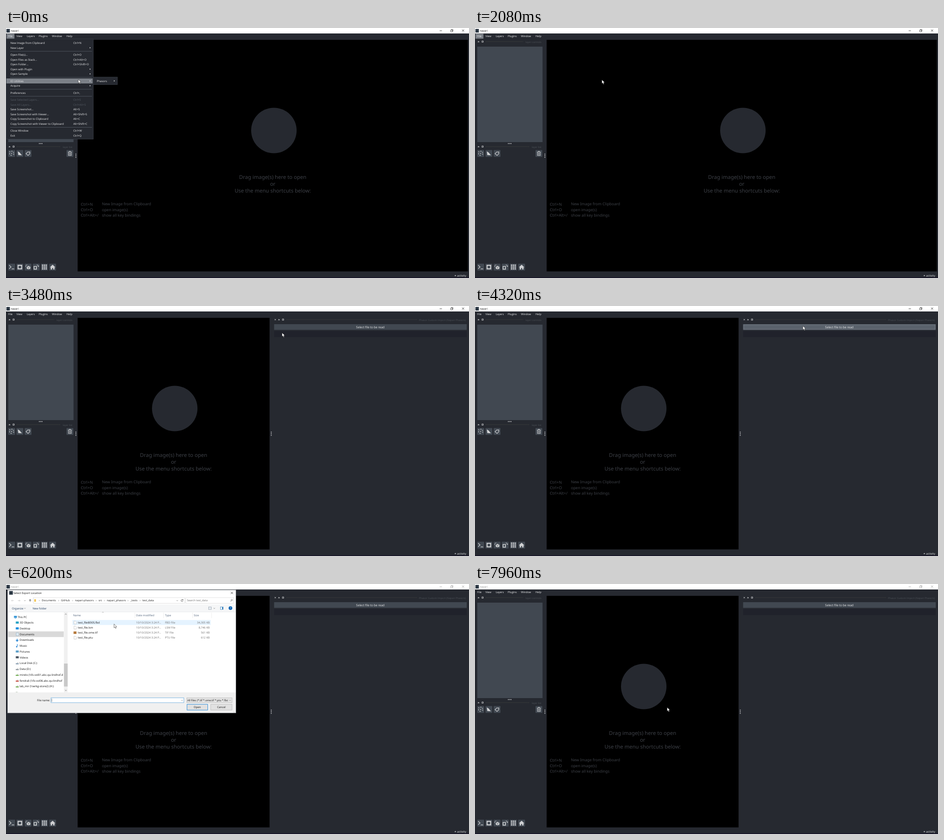
These frames come from a looping animation (1018x550 px, 8 s). An HTML page:

```html
<!DOCTYPE html>
<html lang="en">
<head>
<meta charset="utf-8">
<title>napari</title>
<style>
html, body { margin: 0; width: 100%; height: 100%; overflow: hidden; background: #262930; }
svg { display: block; width: 1018px; height: 550px; }
text { font-family: "Open Sans", "Noto Sans", sans-serif; text-rendering: geometricPrecision; white-space: pre; }
.canvas text { font-family: "Noto Sans", "Open Sans", sans-serif; }
</style>
</head>
<body>
<svg id="stage" viewBox="0 0 1018 550"></svg>
<script>
const BG = '#262930', FG = '#414851', LIGHT = '#d1d2d4', HOT = '#7c8188', DIM = '#4b5056';

// y is the middle of the text line
const text = (x, y, s, { size = 6.04, fill = '#f0f1f2', anchor = 'start' } = {}) =>
  `<text x="${x}" y="${y + size * .35}" font-size="${size}" fill="${fill}" text-anchor="${anchor}">${s}</text>`;
const rect = (x, y, w, h, fill, extra = '') =>
  `<rect x="${x}" y="${y}" width="${w}" height="${h}" fill="${fill}" ${extra}/>`;
const path = (d, stroke, width = 1, fill = 'none', extra = '') =>
  `<path d="${d}" stroke="${stroke}" stroke-width="${width}" fill="${fill}" ${extra}/>`;
const dot = (x, y, r, fill) => `<circle cx="${x}" cy="${y}" r="${r}" fill="${fill}"/>`;
const group = (id, body, extra = '') => `<g id="${id}" ${extra}>${body}</g>`;
const at = (x, y, body) => `<g transform="translate(${x} ${y})">${body}</g>`;
const dots = (x, y, dx, dy, fill = LIGHT) =>
  [-1, 0, 1].map(i => dot(x + i * dx, y + i * dy, 1, fill)).join('');
const arrow = (x, y) => path(`M${x - 1} ${y - 1.6}l2.2 1.6l-2.2 1.6z`, 'none', 0, '#e4e5e6');
const cross = (x, y, r, color, w = .8) =>
  path(`M${x - r} ${y - r}l${2 * r} ${2 * r}m0 ${-2 * r}l${-2 * r} ${2 * r}`, color, w);

function titleBar() {
  return rect(0, 0, 1018, 12, '#fff') + rect(1, 2, 7.5, 8, '#2c3844') +
    group('title', text(10.5, 6, 'napari', { size: 5.8, fill: '#222' }) +
      path('M953.5 6h5', '#222', .8) +
      path('M977.7 4.6h3.8v3.8h-3.8zM979 4.6v-1.3h3.8v3.8h-1.3', '#222', .7) +
      cross(1005, 5.6, 2.3, '#222'));
}

function menuBar() {
  const items = [[5, 'File'], [23, 'View'], [45.5, 'Layers'], [72, 'Plugins'], [101, 'Window'], [133, 'Help']];
  return rect(0, 12, 1018, 13, BG) + group('fileHot', rect(1, 12.5, 17.5, 11, HOT)) +
    items.map(([x, s]) => text(x, 18.2, s, { size: 5.9 })).join('');
}

function dockHead(x, y, end, right, label) {
  return path(`M${x - 2} ${y + 1.5}l1.5-1.5M${x - 1.2} ${y - 1}l2.6 1.4l-1.6 .8z`, LIGHT, .8) +
    path(`M${x + 7} ${y - 1.7}h3.2v3.2h-3.2zM${x + 8.6} ${y - .2}h1.6`, LIGHT, .8) +
    path(`M${x + 16} ${y}H${end}`, '#474a42', .8, 'none', 'stroke-dasharray="2 1"') +
    text(right, y + .6, label, { size: 5.55, fill: DIM, anchor: 'end' });
}

function leftPanel() {
  const icons = {
    points: [[3.5, 4], [8, 2.8], [11.5, 5], [3, 8.2], [7.3, 7.4], [11.8, 9], [6.3, 11.8]].map(p => dot(...p, 1, LIGHT)).join(''),
    shapes: path('M3 3l4 2.5l5 6l-8-.5z', 'none', 0, LIGHT),
    labels: path('M3 8l4-4h4.5v4l-4 4z', LIGHT, 1.1) + dot(9.4, 6, .7, LIGHT),
    trash: path('M3.2 4.5h8.6M6 4.3v-1.5h3v1.5M4.3 5v7h6.4v-7M6.4 6.5v4M8.6 6.5v4', LIGHT, 1),
    console: path('M2 3.5l4.2 3.8l-4.2 3.8', LIGHT, 1.3) + path('M7.5 11.5h5.5', LIGHT, 1.3),
    square: path('M3.6 3.6h7.8v7.8h-7.8z', LIGHT, 2.2),
    cube: path('M4.6 6.4l4-1.6l4 1.6v4.4l-4 2l-4-2z', 'none', 0, LIGHT) +
      path('M4.6 6.4l4 1.8l4-1.8M8.6 8.2v4.4', FG, .7) + path('M2.2 7c0-3 1.4-4.2 3.6-4.4', LIGHT, 1),
    roll: path('M2.6 6h5.4v6.2h-5.4z', LIGHT, 1.7) + path('M8.6 2.6c2.5 0 3.5 1 3.6 3.6M10.4 5l1.8 1.8l1.4-2', LIGHT, 1),
    grid: [0, 1, 2].map(i => [0, 1, 2].map(j => rect(2 + i * 4, 2 + j * 4, 2.8, 2.8, LIGHT)).join('')).join(''),
    home: path('M1.5 8l6-5.8l6 5.8h-1.8v4.8h-3v-3.4h-2.4v3.4h-3v-4.8z', 'none', 0, LIGHT)
  };
  const button = (name, x, y) => at(x, y, rect(0, 0, 15, 15, FG, 'rx="1"') + icons[name]);
  return dockHead(8, 30, 106, 146, 'layer controls') + rect(5, 41, 143.5, 210, FG) +
    dots(76.3, 254.3, 3, 0) + dockHead(8, 261, 120, 146, 'layer list') +
    button('points', 5, 268.5) + button('shapes', 23, 268.5) + button('labels', 41, 268.5) + button('trash', 133, 268.5) +
    dots(153.6, 281, 0, 3.5) +
    ['console', 'square', 'cube', 'roll', 'grid', 'home'].map((n, i) => button(n, 5 + i * 18, 518.5)).join('');
}

function canvas() {
  const ink = '#3d4047', big = { size: 11.5, fill: ink, anchor: 'middle' };
  const keys = [['Ctrl+N', 'New Image from Clipboard'], ['Ctrl+O', 'open image(s)'], ['Ctrl+Alt+/', 'show all key bindings']];
  return `<g class="canvas">${rect(157.5, 26, 858, 509.5, '#000', 'id="black"')}` +
    group('welcome', dot(589, 225.5, 50, BG) + text(586.5, 328, 'Drag image(s) here to open', big) +
      text(586.5, 343, 'or', big) + text(586.5, 357.5, 'Use the menu shortcuts below:', big)) +
    keys.map(([k, s], i) => text(164.5, 387.5 + i * 12.2, k, { size: 8.8, fill: ink }) +
      text(211, 387.5 + i * 12.2, s, { size: 8.5, fill: ink })).join('') + '</g>';
}

function rightDock() {
  return dots(583.3, 281, 0, 3.5) + cross(592, 30, 1.4, LIGHT) + dockHead(600.5, 30, 904, 1011, 'Phasor Custom Import (Napari Phasors)') +
    rect(589.5, 40, 423.5, 12.5, FG) +
    group('btnHot', rect(589.5, 40, 423.5, 12.5, '#5a626c') +
      path('M591 41.5h420.5v9.5h-420.5z', '#9aa0a6', .6, 'none', 'stroke-dasharray="1 1"')) +
    text(801, 46.3, 'Select file to be read', { size: 6.6, anchor: 'middle' }) +
    rect(589.5, 55, 423.5, 13.5, '#20222b');
}

function fileMenu() {
  const rows = [
    [33, 'New Image from Clipboard', 'Ctrl+N'], [43.5, 'New Layer', '>'],
    [59, 'Open File(s)...', 'Ctrl+O'], [69.5, 'Open Files as Stack...', 'Ctrl+Alt+O'],
    [80, 'Open Folder...', 'Ctrl+Shift+O'], [90.5, 'Open with Plugin', '>'], [101, 'Open Sample', '>'],
    [116.5, 'IO Utilities', '>'], [127, 'Acquire', '>'], [142.5, 'Preferences', 'Ctrl+,'],
    [158, 'Save Selected Layers...', 'Ctrl+S', 1], [168.5, 'Save All Layers...', 'Ctrl+Alt+S', 1],
    [179, 'Save Screenshot...', 'Alt+S'], [189.5, 'Save Screenshot with Viewer...', 'Alt+Shift+S'],
    [200, 'Copy Screenshot to Clipboard', 'Alt+C'], [210.7, 'Copy Screenshot with Viewer to Clipboard', 'Alt+Shift+C'],
    [226, 'Close Window', 'Ctrl+W'], [236.7, 'Exit', 'Ctrl+Q']];
  const box = (x, y, w, h) => rect(x, y, w, h, BG, 'stroke="#3a3f47" stroke-width=".8"');
  const sub = (x, w, label) => box(x, 108, w, 16.5) + group('hot' + x, rect(x + 1, 111, w - 2, 11, HOT)) + text(x + 8, 116.5, label);
  return box(.5, 24, 191.5, 220.5) + rect(1, 111, 189.5, 11, HOT) +
    [51.2, 108.6, 134.7, 150.2, 218.5].map(y => path(`M9 ${y}H189`, '#596069', .8)).join('') +
    rows.map(([y, s, key, off]) => {
      const style = { fill: off ? '#555b63' : '#f0f1f2' };
      return text(9.7, y, s, style) + (key === '>' ? arrow(185, y) : text(148, y, key, style));
    }).join('') +
    sub(191.5, 53.5, 'Phasors') + arrow(238.3, 116.3) +
    group('subMenu', sub(245.5, 80, 'Phasor Custom Import'));
}

function opening() {
  return rect(5.5, 13.5, 498, 269.5, '#fff', 'opacity=".86"') + rect(5.5, 13.5, 498, 14, '#fff', 'opacity=".6"') +
    rect(137, 28, 366.5, 209.5, '#d0d0d0', 'opacity=".5"') + rect(5.5, 237.5, 498, 45.5, '#bcbcbc', 'opacity=".55"') +
    rect(128, 62, 9, 175.5, '#d2d2d2') + rect(128, 71, 8.5, 69, '#b0b0b0') +
    path('M130.5 68l2-2l2 2M130.5 232.5l2 2l2-2', '#555', .8) +
    [[69, 250, 28], [100, 250, 290], [396, 250, 99], [396, 263, 46], [449, 263, 46]]
      .map(([x, y, w]) => rect(x, y, w, y > 255 ? 14 : 10, '#eee', 'opacity=".6"')).join('') +
    rect(9, 16.5, 8, 8, '#2c3844') + text(18.5, 21, 'Select Export Location', { fill: '#111' }) + cross(494.7, 20.5, 2.4, '#222');
}

function sidebar() {
  const places = [['This PC', '#3f9bd8'], ['3D Objects', '#29a3c4'], ['Desktop', '#1d8fe0'], ['Documents', '#7fa6c0'],
    ['Downloads', '#2b87d3'], ['Music', '#2585d6'], ['Pictures', '#5c9fc9'], ['Videos', '#4b5560'],
    ['Local Disk (C:)', '#8aa0b3'], ['Data (D:)', '#8f979e'], ['mirelo (\\\\fs-vol01.abc.qu-lindhof.d', '#6aa84a'],
    ['fendrali (\\\\fs-vol06.abc.qu-lindhof', '#c0392b'], ['lab_mir (\\\\wrkg-store2) (H:)', '#6aa84a']];
  const icon = (i, x, y, c) => {
    if (i === 4) return path(`M${x + 3} ${y - 3}v5M${x + .5} ${y}l2.5 2.6l2.5-2.6`, c, 1.6);
    if (i === 5) return dot(x + 2, y + 1.8, 1.5, c) + path(`M${x + 3.1} ${y + 1.8}v-5l2.2 2`, c, .9);
    if (i > 7) return rect(x, y, 6.5, 2.4, c, 'rx=".6"') + path(`M${x + 3} ${y - .6}l2.5-1.6`, '#999', .8);
    if (i === 3) return rect(x + .8, y - 3, 5, 6, '#fff', `stroke="${c}" stroke-width=".7"`) + path(`M${x + 2} ${y - 1}h2.6m-2.6 2h2.6`, c, .6);
    return rect(x, y - 2.6, 6.5, 4.6, c, 'rx=".5"') + (i ? '' : path(`M${x + 1.5} ${y + 3}h3.5`, c, .8));
  };
  return rect(4.5, 104.3, 122.5, 12.4, '#d9d9d9') + '<g clip-path="url(#side)">' + places.map(([s, c], i) => {
    const y = 72.5 + i * 12.72, x = i ? 21.5 : 17.5;
    return icon(i, x, y, c) + text(i > 9 ? 30 : i > 7 ? 30 : i ? 30 : 25.5, y, s, { fill: '#111' });
  }).join('') + rect(21.5, 237.5, 4, .8, '#8fa38a') + '</g>' +
    rect(127.5, 62, 8, 176.5, '#f0f0f0') + rect(127.5, 175, 8, 50.5, '#c8c8c8') +
    path('M129.7 67.3l1.8-1.8l1.8 1.8M129.7 233l1.8 1.8l1.8-1.8', '#555', .8);
}

function fileList() {
  const files = [['test_file$EI0S.fbd', 'FBD File', '34,305 KB'], ['test_file.lsm', 'LSM File', '8,746 KB'],
    ['test_file.ome.tif', 'TIF File', '561 KB'], ['test_file.ptu', 'PTU File', '612 KB']];
  const head = { fill: '#52647c' }, soft = { fill: '#707070' };
  return [283.5, 346.5, 410.5, 452].map(x => path(`M${x} 63v12`, '#e5e5e5', .7)).join('') +
    path('M211 63l2-1.5l2 1.5', '#888', .6) +
    text(147.5, 69, 'Name', head) + text(286, 69, 'Date modified', head) + text(349.5, 69, 'Type', head) + text(413, 69, 'Size', head) +
    group('rowHot', rect(146, 0, 304, 11, '#e5f3ff')) + group('rowSel', rect(146, 79.2, 304, 11, '#cce8ff', 'id="selBox"')) +
    files.map(([name, type, size], i) => {
      const y = 84.8 + i * 11.1;
      return (i === 2 ? rect(148.5, y - 2.6, 6.5, 5.4, '#b5793c')
        : path(`M149.5 ${y - 3.2}h3.4l1.6 1.6v4.9h-5z`, '#aaa', .6, '#fff')) +
        text(158, y, name, { fill: '#111' }) + text(286, y, '10/10/2024 3:24 P...', soft) +
        text(349.5, y, type, soft) + text(448, y, size, { ...soft, anchor: 'end' });
    }).join('');
}

function dialog() {
  const ink = { fill: '#111' }, crumb = { fill: '#222', size: 5.85 };
  const crumbs = [[78.5, 'Documents'], [121, 'GitHub'], [151.7, 'napari-phasors'], [203.5, 'src'], [221.5, 'napari_phasors'], [273.5, '_tests'], [300, 'test_data']];
  const frame = (x, y, w, h, fill, line, id = '') => rect(x, y, w, h, fill, `stroke="${line}" stroke-width=".8" ${id}`);
  const chevron = (x, y) => path(`M${x - 1.5} ${y - .8}l1.5 1.6l1.5-1.6`, '#666', .7);
  return frame(3.5, 13, 502, 270.7, '#fff', '#8a8f94') +
    rect(7, 15.5, 8, 8, '#2c3844') + text(16.3, 20, 'Select Export Location', ink) + cross(496.7, 19.6, 2.5, '#222') +
    path('M17 36.5h-5m2-2l-2 2l2 2M26 36.5h5m-2-2l2 2l-2 2', '#c4c4c4', .8) + chevron(41.5, 36.5) +
    path('M53 39v-5m-2.2 2.2l2.2-2.2l2.2 2.2', '#333', .9) +
    frame(60, 30, 333, 12.5, '#fff', '#d9d9d9') + rect(62, 33.5, 4, 5.5, '#f2c75b') +
    crumbs.map(([x, s]) => text(x, 36.3, s, crumb) + path(`M${x - 6} ${35}l1.4 1.5l-1.4 1.5`, '#777', .6)).join('') +
    chevron(376.5, 36.5) + path('M389 35.2a2.2 2.2 0 1 0 .2 2M389.3 33.6v1.8h-1.8', '#444', .8) +
    frame(395, 30, 106, 12.5, '#fff', '#d9d9d9') + text(398, 36.3, 'Search test_data', { fill: '#6d6d6d', size: 5.9 }) +
    path('M493.5 38.5l2-2', '#555', .9) + `<circle cx="496.5" cy="35.3" r="1.6" fill="none" stroke="#555" stroke-width=".7"/>` +
    rect(4, 45, 501, 16.5, '#f5f6f7') + path('M4 61.5h501', '#e4e6e8', .7) +
    text(13, 53.5, 'Organize', { fill: '#1e395b' }) + chevron(41.5, 53.5) + text(58.5, 53.5, 'New folder', { fill: '#1e395b' }) +
    frame(445.5, 50.5, 6, 5.5, '#e9eef3', '#99a5b0') + chevron(458, 53.5) +
    frame(471.5, 50.5, 6, 5.5, '#fff', '#3b83bd') + rect(475, 50.8, 2.3, 5, '#3b83bd') +
    dot(493.5, 53, 4, '#0b63b5') + text(493.5, 53.2, '?', { fill: '#fff', size: 5.8, anchor: 'middle' }) +
    sidebar() + fileList() +
    rect(4, 238.5, 501, 44.8, '#f0f0f0') + text(97, 256, 'File name:', { ...ink, anchor: 'end' }) +
    frame(99, 250.3, 292, 10.7, '#fff', '#7db4e0', 'id="field"') + chevron(387, 256) +
    group('caret', path('M100.8 252.3v6.8', '#333', .6)) + group('chosen', text(100, 256, 'test_file$EI0S.fbd', ink)) +
    frame(397.5, 250.3, 99.5, 10.7, '#e4e4e4', '#b5b5b5') +
    `<g clip-path="url(#combo)">${text(398.8, 256, 'All files (*.tif *.ome.tif *.ptu *.fbd', { ...ink, size: 5.9 })}</g>` + chevron(492.5, 256) +
    frame(398, 264.7, 45.5, 12.6, '#e1e1e1', '#0078d7', 'id="open"') + text(420.5, 271, 'Open', { ...ink, anchor: 'middle' }) +
    frame(450, 264.7, 47, 12.6, '#e1e1e1', '#b5b5b5') + text(473.5, 271, 'Cancel', { ...ink, anchor: 'middle' }) +
    [0, 1, 2].map(i => dot(503.5 - i * 1.6, 282, .5, '#aaa')).join('');
}

const stage = document.getElementById('stage');
stage.innerHTML =
  '<defs><clipPath id="side"><rect x="4" y="62" width="123" height="177"/></clipPath>' +
  '<clipPath id="combo"><rect x="398" y="250" width="90" height="12"/></clipPath></defs>' +
  rect(0, 0, 1018, 550, BG) + canvas() + titleBar() + menuBar() + leftPanel() + group('dock', rightDock()) +
  path('M986 545.5l2-2.2l2 2.2z', 'none', 0, LIGHT) + text(992, 544.8, 'activity', { size: 6.1 }) +
  rect(0, 548.3, 1018, 1.7, '#171528') +
  group('menu', fileMenu()) + group('opening', opening()) + group('dialog', dialog()) +
  group('cursor', path('M0 0v8.3l1.9-1.7l1.4 3.1l1.5-.7l-1.4-3h2.7z', '#222', .6, '#fff'));

const LOOP = 8000;
// screen refreshes: first, last, count
const TICKS = [[0, 0, 1], [160, 1160, 8], [1280, 2080, 7], [2240, 2240, 1], [2440, 3480, 9], [3640, 4600, 8], [4760, 5000, 2],
  [5200, 5800, 5], [5920, 6200, 3], [6360, 6960, 5], [7120, 7560, 4], [7800, 7960, 2]];
// cursor: time, x, y
const TRAIL = [[0, 159, 113], [160, 161, 113], [720, 208, 114], [1160, 226, 114], [1720, 279, 114], [2520, 279, 114],
  [3480, 607, 59], [4200, 721, 44], [5000, 721, 44], [5200, 700, 46], [5800, 290, 82], [6200, 237.5, 88],
  [6520, 196, 81], [6960, 196, 81], [7560, 424, 269], [7800, 424, 269], [7960, 422.5, 271.5]];

function hold(t) {
  const [a, b, n] = TICKS.findLast(k => k[0] <= t);
  if (n < 2) return a;
  const step = (b - a) / (n - 1);
  return a + step * Math.min(n - 1, Math.floor((t - a) / step + 1e-6));
}

function pointer(t) {
  const i = TRAIL.findIndex(k => k[0] > t);
  if (i < 0) return TRAIL.at(-1).slice(1);
  const [t0, x0, y0] = TRAIL[i - 1], [t1, x1, y1] = TRAIL[i];
  const u = (t - t0) / (t1 - t0), e = u * u * (3 - 2 * u);
  return [x0 + (x1 - x0) * e, y0 + (y1 - y0) * e];
}

const el = id => document.getElementById(id);
const show = (id, on) => el(id).setAttribute('visibility', on ? 'inherit' : 'hidden');

function draw(now) {
  const t = hold(now % LOOP), [x, y] = pointer(t);
  const docked = t >= 2440, browsing = t >= 5200 && t < 7800, picked = t >= 6600;
  el('cursor').setAttribute('transform', `translate(${x} ${y})`);
  el('black').setAttribute('width', docked ? 422 : 858);
  el('welcome').setAttribute('transform', `translate(${docked ? -218 : 0} 0)`);
  el('title').setAttribute('opacity', t >= 4900 ? .45 : 1);
  show('fileHot', !docked);
  show('dock', docked);
  show('btnHot', docked && x > 589 && y > 39 && y < 52 && t < 5200);
  show('menu', t < 1900);
  show('hot191.5', x > 192);
  show('subMenu', t < 1900 && x > 200);
  show('hot245.5', x > 246 && t < 1900);
  for (const id of ['hot191.5', 'hot245.5']) if (t >= 1900) show(id, false);
  show('opening', t >= 4900 && t < 5200);
  show('dialog', browsing);
  const row = Math.floor((y - 79.2) / 11.1);
  const over = browsing && x > 146 && x < 450 && row >= 0 && row < 4;
  show('rowHot', over);
  el('rowHot').setAttribute('transform', `translate(0 ${79.2 + 11.1 * row})`);
  show('rowSel', browsing && picked);
  el('selBox').setAttribute('fill', t >= 7500 ? '#d9d9d9' : '#cce8ff');
  show('caret', browsing && !picked);
  show('chosen', browsing && picked);
  el('field').setAttribute('stroke', picked ? '#c4c4c4' : '#5ba3dc');
  el('open').setAttribute('fill', x > 398 && x < 443 && y > 264 ? '#c4e0f5' : '#e1e1e1');
}

const start = performance.now();
(function frame() {
  draw(performance.now() - start);
  requestAnimationFrame(frame);
})();
</script>
</body>
</html>
```
